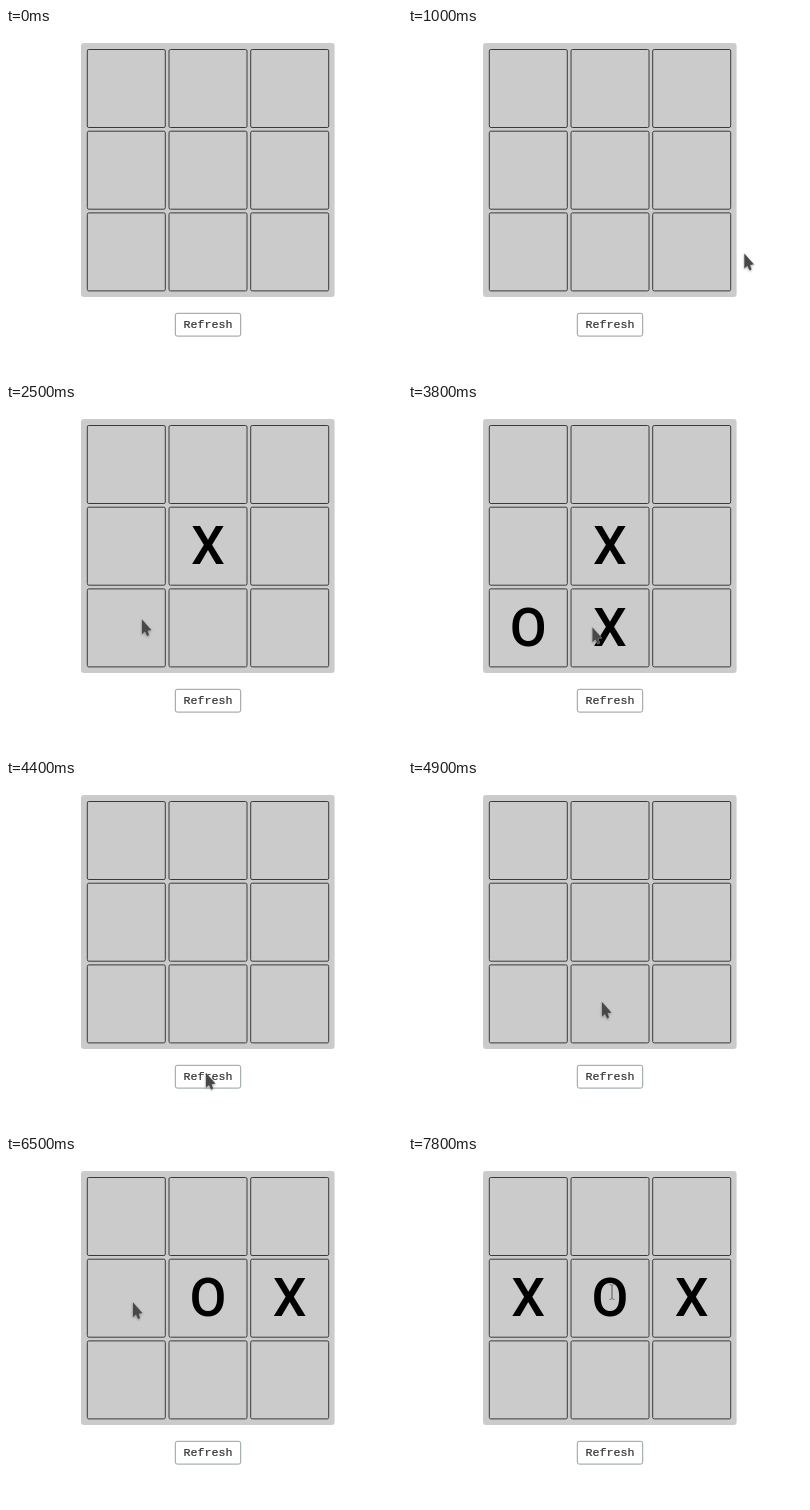
Write an HTML page that moves like this. It is 396 px wide and 348 px high and loops after 8 s.

```html
<!DOCTYPE html>
<html lang="en">
<head>
<meta charset="utf-8">
<title>Tic-tac-toe</title>
<style>
  html, body { margin: 0; width: 100%; height: 100%; overflow: hidden; background: #fff; }
  svg { display: block; width: 396px; height: 348px; }
  .cell { fill: #cbcbcb; stroke: #3a3a3a; }
  .mark { font: 500 53.5px Roboto, sans-serif; text-anchor: middle; }
  .label { font: 400 11.67px "Liberation Mono", monospace; fill: #333; stroke: #333; stroke-width: .2; text-anchor: middle; }
  #button { fill: #fff; stroke: #999; }
  #button.focus { stroke: #93a09b; }
  #arrow { fill: #484848; stroke: #aaa; stroke-width: .8; paint-order: stroke; filter: drop-shadow(0 1px 1px #0004); }
  #beam { fill: none; stroke: #777; }
  #beam .halo { stroke: #ddd; stroke-width: 2.4; }
</style>
</head>
<body>
<svg viewBox="0 0 396 348">
  <rect x="75" y="15" width="253.6" height="254" rx="3" fill="#cbcbcb"/>
  <g id="board"></g>
  <rect id="button" x="169.3" y="285.3" width="65.4" height="22.8" rx="2"/>
  <text class="label" x="202" y="300">Refresh</text>
  <path id="arrow" d="M0 0V14.5L3 12L5.2 16.5L7 15.6L5.6 11.2L9.3 10.5Z"/>
  <g id="beam">
    <path class="halo" d="M0 -6V6"/>
    <path d="M-2.5 -7.5Q0 -7.5 0 -6V6Q0 7.5 -2.5 7.5M2.5 -7.5Q0 -7.5 0 -6V6Q0 7.5 2.5 7.5"/>
  </g>
</svg>
<script>
const DURATION = 8000, STEP = 100, PITCH = 81.7, ENTER = 900, REFRESH = 4400;
const $ = id => document.getElementById(id);
const center = i => ({ x: 120.3 + (i % 3) * PITCH, y: 60.5 + Math.floor(i / 3) * PITCH });

// Players alternate at a steady pace; X opens each game
const games = [
  { cells: [4, 6, 7], start: 1600, pace: 1100, end: REFRESH },
  { cells: [5, 4, 3], start: 5900, pace: 400, end: DURATION },
];

// Pointer strokes: departure, arrival, x, y; it rests in between
const strokes = [
  [800, 1300, 217.5, 150], [1700, 1800, 217, 152], [1900, 2500, 136, 215.5],
  [2600, 3100, 184.5, 223.5], [3800, 4300, 200, 293], [4700, 4900, 194, 222],
  [4900, 5600, 275, 127], [5900, 6500, 127, 146.5], [6700, 7300, 199, 130],
  [7700, 7800, 204, 136],
];

function add(tag, attrs, text = '') {
  const el = document.createElementNS('http://www.w3.org/2000/svg', tag);
  for (const name in attrs) el.setAttribute(name, attrs[name]);
  el.textContent = text;
  return $('board').appendChild(el);
}

for (let i = 0; i < 9; i++) {
  const { x, y } = center(i);
  add('rect', { class: 'cell', x: x - 39, y: y - 39, width: 78, height: 78, rx: 1.5 });
}
const marks = games.flatMap(({ cells, start, pace, end }) => cells.map((cell, i) => {
  const { x, y } = center(cell);
  const el = add('text', { class: 'mark', x, y: y + 17.8 }, 'XO'[i % 2]);
  return { el, x, y, from: start + i * pace, to: end };
}));

function pointerAt(t) {
  let x = 401, y = 267;
  for (const [from, to, toX, toY] of strokes) {
    const k = Math.min(1, Math.max(0, (t - from) / (to - from)));
    const ease = k * k * (3 - 2 * k);
    x += (toX - x) * ease;
    y += (toY - y) * ease;
  }
  return { x, y };
}

function draw(now) {
  const t = Math.floor(now % DURATION / STEP) * STEP;
  const { x, y } = pointerAt(t);
  let overText = false;
  for (const mark of marks) {
    const visible = t >= mark.from && t < mark.to;
    mark.el.style.display = visible ? '' : 'none';
    overText ||= visible && Math.abs(x - mark.x) < 17 && Math.abs(y - mark.y) < 30;
  }
  for (const id of ['arrow', 'beam']) {
    $(id).setAttribute('transform', `translate(${x} ${y})`);
    $(id).style.display = t >= ENTER && overText === (id === 'beam') ? '' : 'none';
  }
  $('button').classList.toggle('focus', t >= REFRESH);
  requestAnimationFrame(draw);
}
requestAnimationFrame(draw);
</script>
</body>
</html>
```
